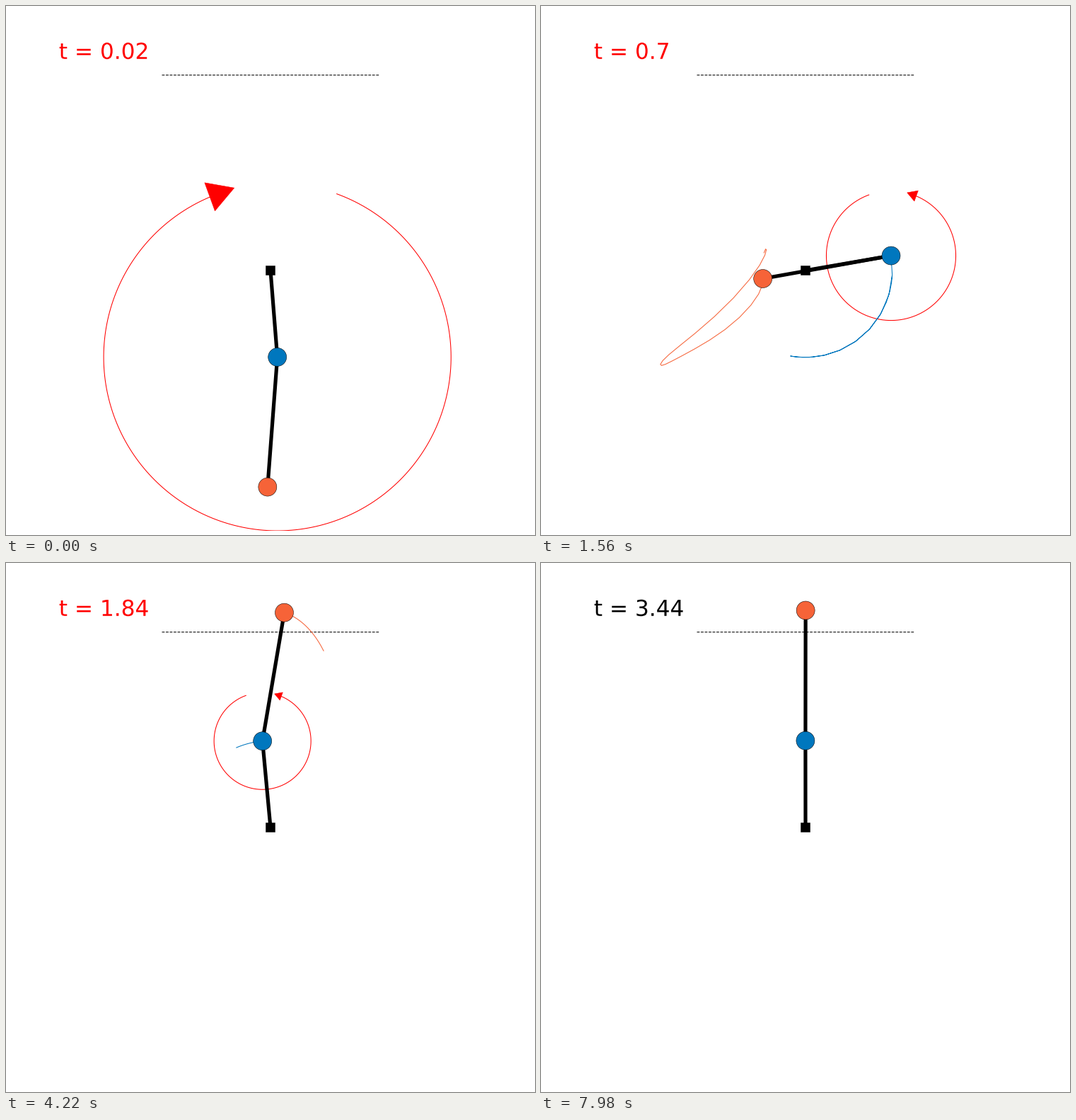
Animation of 748x748 px, one loop 8 s. Source, as a matplotlib script:

```python
import numpy as np
import matplotlib.pyplot as plt
from matplotlib.animation import FuncAnimation
from matplotlib.patches import Circle, PathPatch, Rectangle, RegularPolygon
from matplotlib.textpath import TextPath
from matplotlib.transforms import Affine2D

plt.rcParams["path.snap"] = False

# Double pendulum swing-up, torque applied at the elbow
L1, L2 = 0.2, 0.3
DT = 0.02
STEPS = 172
TRAIL = 25
BLUE, ORANGE = "#0077BE", "#f66338"

# Link angles in degrees from hanging straight down, one pose every GAP steps
GAP = 4
INNER = [0, 46.8, 85, 82.2, 48, 2.5, -9.3, 13, 60.3,
         111.5, 146.3, 172, 194.9, 210.9, 214.4, 210.3, 206.5, 203.1]
OUTER = [0, -44.2, -83, -104.8, -112, -95, -85.9, -92.8, -93.7,
         -73.6, -47.7, -18.8, 21, 60.6, 98, 117.5, 128, 138]
DECAY = 16.3         # steps, once the arm settles upright

# Outer link: inertia, coupling to the inner link, gravity
INERTIA, COUPLING, GRAVITY = 0.055, 0.032, 1.75
MAX_TORQUE, MIN_TORQUE = 6, 0.018


def link_angle(s, poses):
    """Smooth swing through the poses, then exponential settling at 180."""
    p = np.array(poses, float)
    n = len(p)
    rows = 4 * np.eye(n) + np.eye(n, k=1) + np.eye(n, k=-1)
    rows[[0, -1]] = np.eye(n)[[0, -1]]
    rhs = np.zeros(n)
    rhs[1:-1] = 3 * (p[2:] - p[:-2])
    rhs[-1] = (180 - p[-1]) * GAP / DECAY
    m = np.linalg.solve(rows, rhs)

    x = (s - s[0]) / GAP
    i = np.clip(x.astype(int), 0, n - 2)
    u = x - i
    swing = ((1 + 2 * u) * (1 - u) ** 2 * p[i] + u * (1 - u) ** 2 * m[i]
             + u * u * (3 - 2 * u) * p[i + 1] + u * u * (u - 1) * m[i + 1])
    settle = 180 + (p[-1] - 180) * np.exp(-(x - n + 1) * GAP / DECAY)
    return np.radians(np.where(x < n - 1, swing, settle))


def tip(base, angle, length):
    return base + length * np.column_stack([np.sin(angle), -np.cos(angle)])


# One extra step on either side gives the central differences
steps = np.arange(-1, STEPS + 1)
a1, a2 = link_angle(steps, INNER), link_angle(steps, OUTER)
acc1, acc2 = np.diff(a1, 2) / DT ** 2, np.diff(a2, 2) / DT ** 2
vel1 = (a1[2:] - a1[:-2]) / (2 * DT)
a1, a2 = a1[1:-1], a2[1:-1]
bend = a2 - a1
torque = np.clip(
    INERTIA * acc2 + GRAVITY * np.sin(a2)
    + COUPLING * (acc1 * np.cos(bend) + vel1 ** 2 * np.sin(bend)),
    -MAX_TORQUE, MAX_TORQUE)
elbow = tip(np.zeros(2), a1, L1)
hand = tip(elbow, a2, L2)

fig = plt.figure(figsize=(20, 20), dpi=37.4, facecolor="white")
ax = fig.add_axes([0.0075, 0.0075, 0.985, 0.985])
ax.set(xlim=(-0.6, 0.6), ylim=(-0.6, 0.6))
ax.axis("off")

SIZE = 0.02115       # ball radius and base width
ax.plot([-0.25, 0.25], [0.45, 0.45], "--", color="black", lw=2)
trails = [ax.plot([], [], color=c, lw=2)[0] for c in (BLUE, ORANGE)]
links = [ax.plot([], [], color="black", lw=10)[0] for _ in range(2)]
ax.add_patch(Rectangle((-SIZE / 2, -SIZE / 2), SIZE, SIZE,
                       fc="black", ec="black", lw=1, zorder=3))
balls = [ax.add_patch(Circle((0, 0), SIZE, fc=c, ec="black", lw=1, zorder=3))
         for c in (BLUE, ORANGE)]
arc, = ax.plot([], [], color="red", lw=2, zorder=1)
head = ax.add_patch(RegularPolygon((0, 0), 3, radius=0.01, color="red"))

# Outlined text keeps its exact place between pixels
EM = 60 * fig.dpi / 72
clock = PathPatch(TextPath((0, 0), "t", size=EM), lw=0,
                  transform=Affine2D().translate(74.8, 673.2))
fig.add_artist(clock)

sweep = np.radians(np.linspace(110, 430, 240))
ring = np.column_stack([np.cos(sweep), np.sin(sweep)])


def draw_torque(center, value):
    shown = abs(value) > MIN_TORQUE
    arc.set_visible(shown)
    head.set_visible(shown)
    radius = 0.1 + 0.05 * abs(value)
    arc.set_data(*(center + radius * ring).T)
    end = 0 if value < 0 else -1
    head.xy = tuple(center + radius * ring[end])
    head.radius = radius / 10
    head.orientation = np.radians(290 if value < 0 else 70)


def step_at(frame):
    # steps last 20, 100 and 20 ms in turn
    block, rest = divmod(frame, 7)
    return 3 * block + (0 if rest == 0 else 1 if rest < 6 else 2)


def update(frame):
    k = step_at(frame)
    joints = np.array([(0, 0), elbow[k], hand[k]])
    for i, path in enumerate((elbow, hand)):
        trails[i].set_data(*path[max(0, k - TRAIL + 1):k + 1].T)
        links[i].set_data(*joints[i:i + 2].T)
        balls[i].center = tuple(path[k])
    draw_torque(elbow[k], torque[k])
    label = f"t = {round(DT * (k + 1), 3)}"
    clock.set_path(TextPath((0, 0), label, size=EM))
    clock.set_facecolor("red" if k < 115 else "black")
    return []


anim = FuncAnimation(fig, update, frames=400, interval=20,
                     init_func=lambda: [], repeat=True, repeat_delay=0)
plt.show()
```
